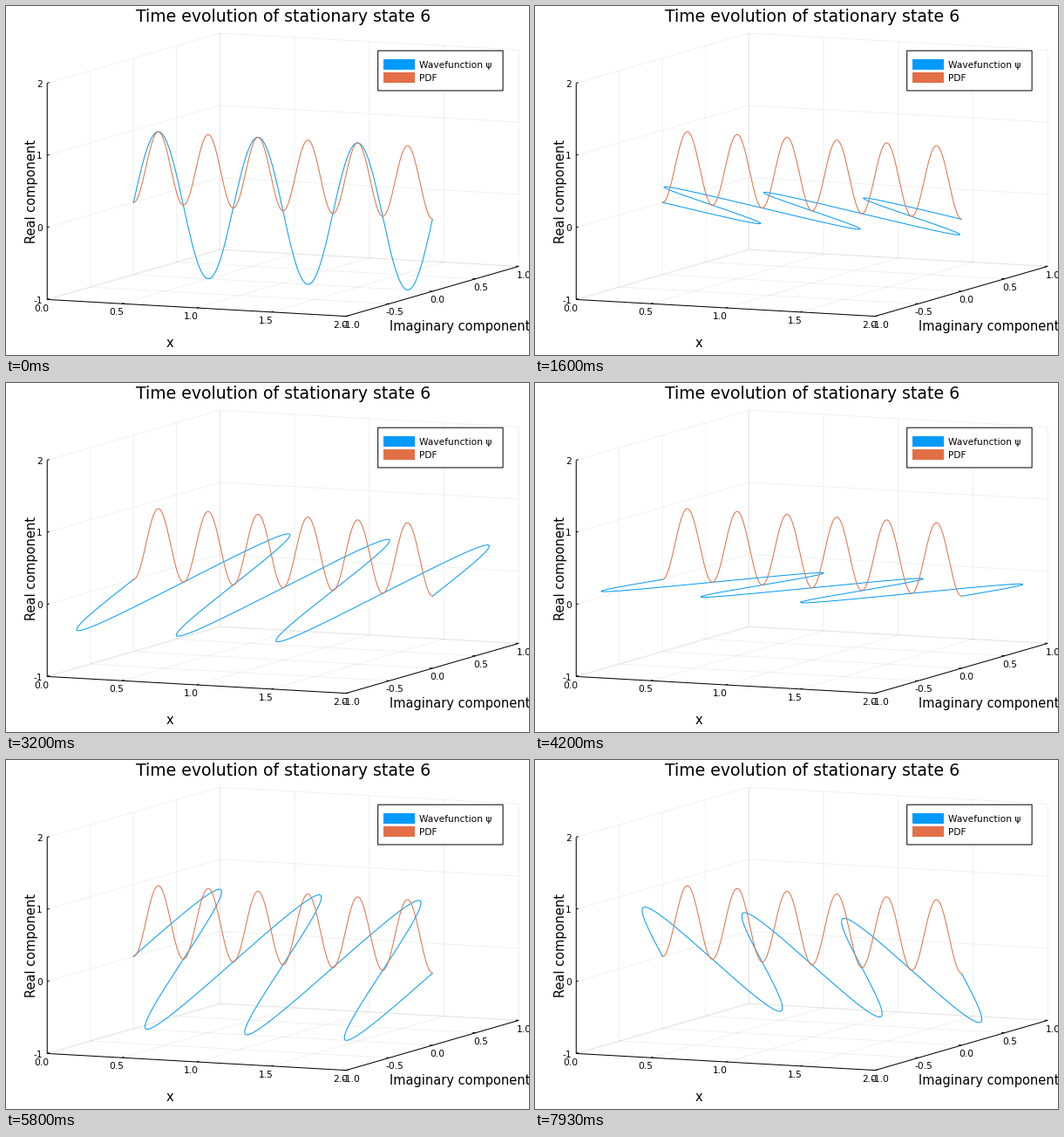
Recreate the animation shown at these times as a matplotlib script. Size 600 by 400 pixels, loop 8000 ms.

```python
import numpy as np
import matplotlib.pyplot as plt
from matplotlib.animation import FuncAnimation
from matplotlib.patches import Rectangle

W, H, DPI = 600, 400, 100
LOOP_MS, TICK_MS = 8000, 20
STEPS = 120                     # poses per loop, 15 per second
STATE, LENGTH = 6, 2.0
PHASE_STEP = np.radians(-69.826)
BLUE, ORANGE = "#009afa", "#e36f47"

plt.rcParams["font.family"] = "DejaVu Sans"


def px(size):
    """Pixels to points."""
    return size * 72 / DPI


def project(x, im, re):
    """Orthographic view of (x, imaginary, real) in pixels."""
    u = 47.25 + 171.5 * x + 99.0 * (im + 1)
    v = 336.4 + 9.6 * x - 28.6 * (im + 1) - 82.67 * (re + 1)
    return u, v


fig = plt.figure(figsize=(W / DPI, H / DPI), dpi=DPI, facecolor="white")
ax = fig.add_axes([0, 0, 1, 1])
ax.set_xlim(0, W)
ax.set_ylim(H, 0)
ax.axis("off")


def path(*points, alpha=1.0, width=1.0, z=2, snap=None):
    u, v = zip(*(project(*p) for p in points))
    ax.plot(u, v, color="black", alpha=alpha, lw=px(width), zorder=z,
            snap=snap, solid_capstyle="butt")


def label(u, v, text, size, ha="center", **kw):
    ax.text(u, v, text, fontsize=px(size), ha=ha, va="baseline", zorder=6, **kw)


# Grid: each tick crosses two of the three far planes.
x_ticks = [0, 0.5, 1, 1.5, 2]
im_ticks = [-1, -0.5, 0, 0.5, 1]
re_ticks = [-1, 0, 1, 2]
grid = dict(alpha=0.06, z=1, snap=False)
for t in x_ticks:
    path((t, -1, -1), (t, 1, -1), **grid)
    path((t, 1, -1), (t, 1, 2), **grid)
for t in im_ticks:
    path((2, t, -1), (0, t, -1), **grid)
    path((0, t, -1), (0, t, 2), **grid)
for t in re_ticks:
    path((0, -1, t), (0, 1, t), **grid)
    path((0, 1, t), (2, 1, t), **grid)

# Axes, ticks and tick labels
SMALL = 32 / 3
path((0, -1, 2), (0, -1, -1), (2, -1, -1), (2, 1, -1))
for t in x_ticks:
    path((t, -1, -1), (t, -0.975, -1))
    u, v = project(t, -1, -1)
    label(u - 6.3, v + 13.1, f"{t:.1f}", SMALL)
for t in im_ticks:
    path((2, t, -1), (1.98, t, -1))
    u, v = project(2, t, -1)
    label(u + 6, v + 13.1, f"{t:.1f}", SMALL)
for t in re_ticks:
    path((0, -1, t), (0, -0.975, t))
    u, v = project(0, -1, t)
    label(u - 5.5, v + 4.2, str(t), SMALL, ha="right")

# Titles
GUIDE = 44 / 3
label(318, 17.5, "Time evolution of stationary state 6", 18.85)
label(187.7, 391, "x", GUIDE)
label(520.3, 372, "Imaginary component", GUIDE)
label(34.3, 212, "Real component", GUIDE, rotation=90, rotation_mode="anchor")

# Legend
ax.add_patch(Rectangle((426.7, 51.2), 143.4, 45.8, fc="white", ec="black",
                       lw=px(1), snap=False, zorder=4))
for top, color, text in ((61, BLUE, "Wavefunction ψ"), (76, ORANGE, "PDF")):
    ax.add_patch(Rectangle((433, top), 36, 12, fc=color, lw=0, zorder=5))
    label(474, top + 10.2, text, SMALL, ha="left")

# Curves
xs = np.linspace(0, LENGTH, 401)
psi = np.sqrt(2 / LENGTH) * np.sin(STATE * np.pi * xs / LENGTH)
curve = dict(lw=px(1), solid_joinstyle="round")
wave, = ax.plot([], [], color=BLUE, zorder=3, **curve)
ax.plot(*project(xs, 0, psi ** 2), color=ORANGE, zorder=3.1, **curve)


def update(i):
    # Poses hold for 60 or 70 ms; the small lead keeps each start on its tick.
    step = (i * TICK_MS + 14) * STEPS // LOOP_MS
    phase = PHASE_STEP * step
    wave.set_data(*project(xs, psi * np.sin(phase), psi * np.cos(phase)))
    return wave,


anim = FuncAnimation(fig, update, frames=LOOP_MS // TICK_MS, interval=TICK_MS,
                     repeat=True, repeat_delay=0)
plt.show()
```
